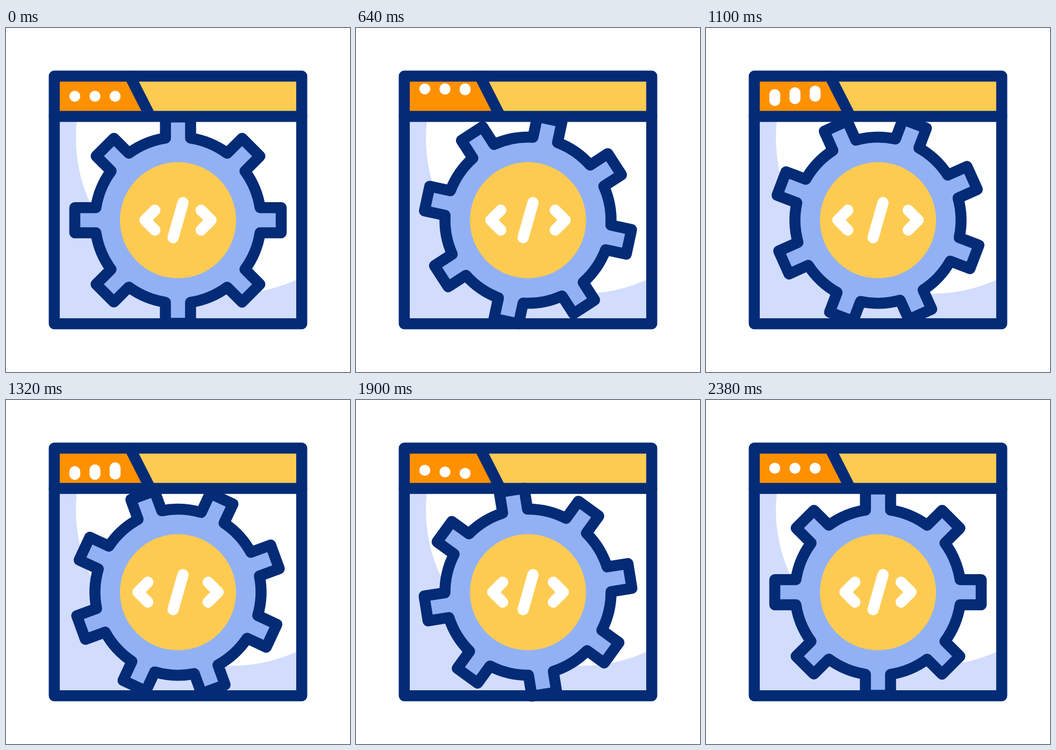
Recreate the animation shown at these times as an HTML page with a canvas. Size 640x640 px, loop 2400 ms.

```html
<!DOCTYPE html>
<html lang="en">
<head>
<meta charset="utf-8">
<title>Gear window</title>
<style>
  html, body { margin: 0; width: 100%; height: 100%; overflow: hidden; background: #fff; }
  canvas { display: block; width: 640px; height: 640px; }
</style>
</head>
<body>
<canvas id="stage" width="640" height="640"></canvas>
<script>
const ctx = document.getElementById('stage').getContext('2d');
const LOOP = 2400, SPAN = 2380;
const NAVY = '#032b76', ORANGE = '#ff9100', YELLOW = '#fecb52';
const BLUE = '#92b1f4', PALE = '#d2dcfd', WHITE = '#fff';
const LINE = 20.5;
const CENTER = { x: 320, y: 357.6 };

// Cubic ease (0.5, 0, 0.5, 1) in closed form.
function ease(x) {
  x = Math.min(1, Math.max(0, x));
  const s = 0.5 + Math.sinh(Math.asinh(4 * x - 2) / 3);
  return s * s * (3 - 2 * s);
}

function trace(points, closed) {
  ctx.beginPath();
  points.forEach(([x, y]) => ctx.lineTo(x, y));
  if (closed) ctx.closePath();
}

function fillPolygon(points, color) {
  trace(points, true);
  ctx.fillStyle = color;
  ctx.fill();
}

function strokeLine(points, color, width = LINE, closed = false) {
  trace(points, closed);
  ctx.strokeStyle = color;
  ctx.lineWidth = width;
  ctx.stroke();
}

function disc(x, y, r, color) {
  ctx.beginPath();
  ctx.arc(x, y, r, 0, Math.PI * 2);
  ctx.fillStyle = color;
  ctx.fill();
}

function drawWindow() {
  ctx.save();
  ctx.beginPath();
  ctx.rect(90, 164, 460, 386);
  ctx.clip();
  ctx.fillStyle = PALE;
  ctx.fillRect(90, 164, 460, 386);
  disc(420, 204.5, 290, WHITE);
  ctx.restore();

  fillPolygon([[90, 90], [550, 90], [550, 164], [90, 164]], YELLOW);
  fillPolygon([[90, 90], [230.7, 90], [268.3, 164], [90, 164]], ORANGE);
  strokeLine([[230.7, 90], [268.3, 164]], NAVY);
  strokeLine([[89.8, 89.6], [550.2, 89.6], [550.2, 550.2], [89.8, 550.2]], NAVY, LINE, true);
  strokeLine([[89.8, 164.5], [550.2, 164.5]], NAVY);
}

// Each move: [distance, start, duration, delay per dot].
const TOP_MOVES = [[-13.7, 0, 340, 60], [25, 595, 1090, 85], [-11.3, 1549, 600, 85]];
const BOTTOM_MOVES = [[-13.7, 132, 538, 60], [25, 666, 600, 60], [-11.3, 1549, 600, 85]];

function travel(moves, t, index) {
  return moves.reduce((y, [distance, start, duration, delay]) =>
    y + distance * ease((t - start - index * delay) / duration), 127);
}

function drawDots(t) {
  for (let i = 0; i < 3; i++) {
    const x = 128 + 37.5 * i;
    const top = travel(TOP_MOVES, t, i), bottom = travel(BOTTOM_MOVES, t, i);
    strokeLine([[x, top], [x, bottom + 0.01]], WHITE, 20.4);
  }
}

function drawGear(t) {
  const radius = 154.5, tip = 192, half = 23.4;
  const spread = Math.asin(half / radius);
  ctx.save();
  ctx.translate(CENTER.x, CENTER.y);
  ctx.rotate(t / SPAN * Math.PI / 4);
  ctx.beginPath();
  for (let i = 0; i < 8; i++) {
    const a = i * Math.PI / 4, c = Math.cos(a), s = Math.sin(a);
    for (const side of [-half, half]) {
      ctx.lineTo(tip * c - side * s, tip * s + side * c);
    }
    ctx.arc(0, 0, radius, a + spread, a + Math.PI / 4 - spread);
  }
  ctx.closePath();
  ctx.fillStyle = BLUE;
  ctx.fill();
  ctx.strokeStyle = NAVY;
  ctx.lineWidth = LINE;
  ctx.stroke();
  ctx.restore();
  disc(CENTER.x, CENTER.y, 108, YELLOW);
}

function drawCode(t) {
  const phase = t / SPAN * 2;
  const shift = 13.3 * ease(phase < 1 ? phase : 2 - phase);
  for (const side of [-1, 1]) {
    const tip = CENTER.x + side * (61.5 + shift), arm = tip - side * 18.5;
    strokeLine([[arm, 339], [tip, 357.5], [arm, 376]], WHITE, 20.8);
  }
  strokeLine([[329.3, 325], [310.9, 390]], WHITE, 21);
}

function draw() {
  const t = performance.now() % LOOP;
  ctx.fillStyle = WHITE;
  ctx.fillRect(0, 0, 640, 640);
  drawWindow();
  drawDots(t);
  drawGear(t);
  drawCode(t);
  requestAnimationFrame(draw);
}

ctx.lineCap = ctx.lineJoin = 'round';
draw();
</script>
</body>
</html>
```
